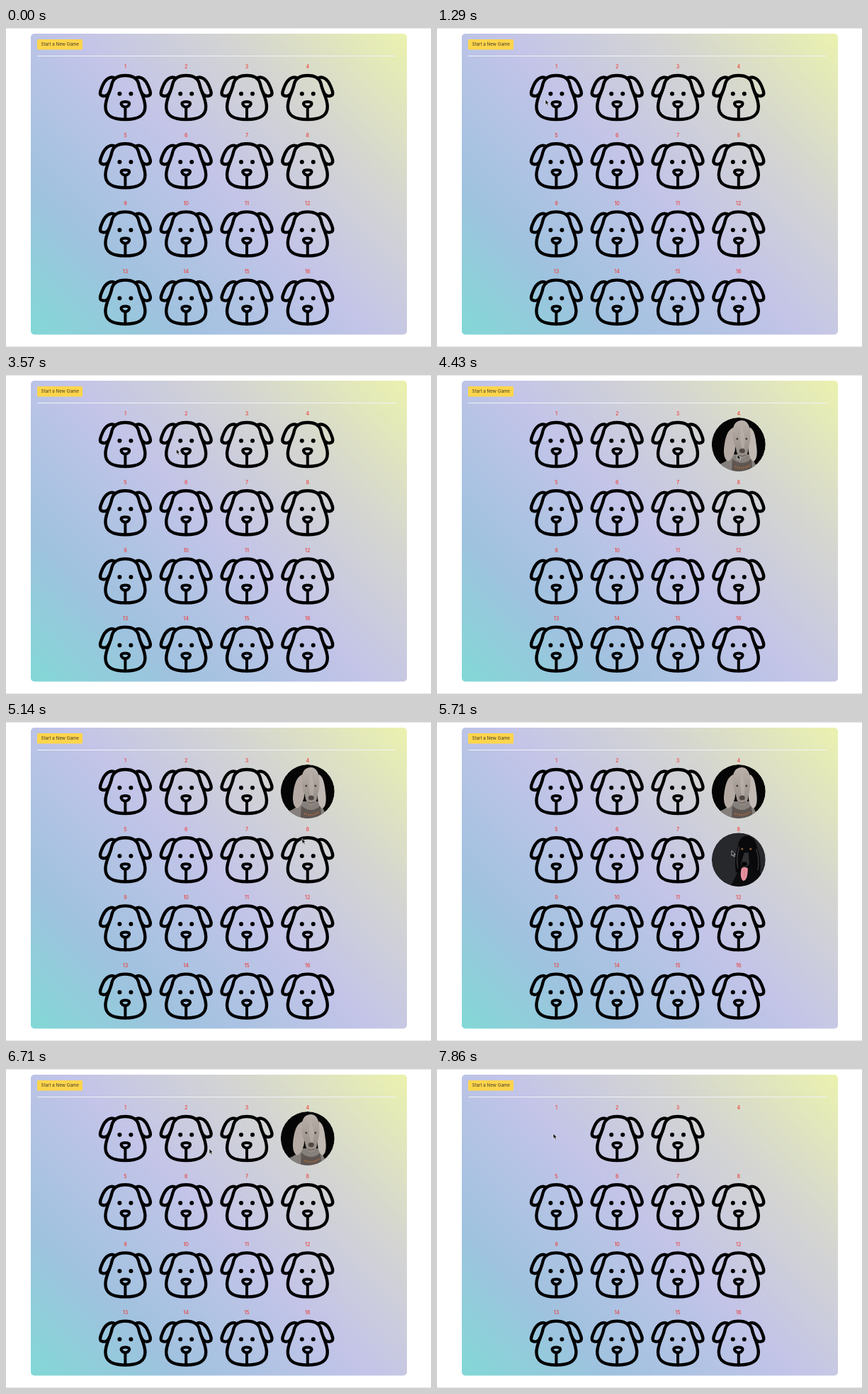
An HTML page that plays this animation: 600 px wide and 450 px high, repeating every 8 s.

```html
<!DOCTYPE html>
<html lang="en">
<head>
<meta charset="utf-8">
<title>Dog memory game</title>
<style>
  html, body { margin: 0; width: 100%; height: 100%; overflow: hidden; background: #fff; }
  svg { display: block; width: 100%; height: 100%; }
  text { font-family: Inter, Roboto, sans-serif; }
  .number { font-size: 7.2px; font-weight: 500; fill: #ee443e; text-anchor: middle; }
</style>
</head>
<body>
<svg viewBox="0 0 600 450">
  <defs>
    <!-- 45 degree gradient line spanning the panel corners -->
    <linearGradient id="backdrop" gradientUnits="userSpaceOnUse" x1="61.7" y1="458.8" x2="539.3" y2="-18.8">
      <stop offset="0" stop-color="#82d8d6"/>
      <stop offset=".22" stop-color="#9fc2df"/>
      <stop offset=".5" stop-color="#c3c4e8"/>
      <stop offset=".75" stop-color="#d5d6d0"/>
      <stop offset="1" stop-color="#ebf2ae"/>
    </linearGradient>
    <linearGradient id="coat" x2="0" y2="1">
      <stop offset="0" stop-color="#b9b1aa"/>
      <stop offset="1" stop-color="#928983"/>
    </linearGradient>
    <clipPath id="round"><circle r="38"/></clipPath>

    <g id="back" fill="none" stroke="#000" stroke-width="4.4" stroke-linecap="round" stroke-linejoin="round">
      <path d="M0-31C-10-31-17-27-19-19C-21-8-28 1-28 13C-28 26-18 31 0 31C18 31 28 26 28 13C28 1 21-8 19-19C17-27 10-31 0-31Z"/>
      <path id="ear" d="M-14-27C-22-32-29-24-32-17C-35-10-37-5-34-3C-30-1-25-2-23-7"/>
      <use href="#ear" transform="scale(-1 1)"/>
      <path d="M-5 7Q0 5 5 7Q7 9 4 12Q0 15 -4 12Q-7 9 -5 7ZM0 15V31" stroke-width="4"/>
      <path d="M-8-5.3h.01M8-5.3h.01" stroke-width="6"/>
    </g>

    <g id="grayDog" clip-path="url(#round)">
      <circle r="38" fill="#050505"/>
      <path d="M-38 40L-27 28Q-14 23-8 14L17 14Q22 25 30 40Z" fill="#85807c"/>
      <path d="M-9 20Q5 32 18 20L20 40H-10Z" fill="#5f5651"/>
      <path d="M-5 31Q6 36 16 29" fill="none" stroke="#b56b38" stroke-width="2" stroke-dasharray="1.5 1.5"/>
      <path d="M-7-24Q-17-21-20 0Q-23 19-15 24Q-8 21-5 8L-4-17Z" fill="#b4aaa3"/>
      <path d="M16-24Q23-21 25 0Q28 20 21 24Q15 21 14 8L13-17Z" fill="#c1b9b4"/>
      <path d="M5-34Q-7-34-8-20Q-9-5-4 5Q-2 18 5 20Q13 18 14 5Q18-6 16-22Q13-34 5-34Z" fill="url(#coat)"/>
      <path d="M4-29L2-9L4 5H8L9-9Z" fill="#c2bab4" opacity=".5"/>
      <ellipse cx="5" cy="9" rx="4" ry="3.3" fill="#514844"/>
      <path d="M0 15Q5 18 10 15" fill="none" stroke="#625751"/>
      <circle cx="-2" cy="-8" r="1.5" fill="#483f35"/>
      <circle cx="11" cy="-8" r="1.5" fill="#483f35"/>
    </g>

    <g id="blackDog" clip-path="url(#round)">
      <circle r="38" fill="#27282c"/>
      <path d="M-13 40Q-4 24 1 12L25 8Q35 25 39 40Z" fill="#0c0c0e"/>
      <path d="M12-34Q0-33-1-18Q-7-2-4 17Q1 22 6 10H19Q24 23 30 20Q33 1 26-18Q23-33 12-34Z" fill="#09090b"/>
      <path d="M1-18Q-4-2-1 12M25-15Q30 0 27 15" fill="none" stroke="#3e3f43" stroke-width="1.2"/>
      <path d="M8-10L3 6Q8 15 15 6L14-10Z" fill="#303034"/>
      <ellipse cx="8" cy="6" rx="4" ry="3" fill="#050506"/>
      <path d="M4 12Q8 9 13 12Q13 28 7 30Q1 27 4 12Z" fill="#e58f9d"/>
      <path d="M8 14V24" stroke="#c56f80" stroke-width=".7"/>
      <circle cx="5" cy="-15" r="1.4" fill="#94643a"/>
      <circle cx="17" cy="-15" r="1.4" fill="#94643a"/>
    </g>
  </defs>

  <path d="M0 .5H600M0 449.5H600" stroke="#e6e6e6"/>
  <rect x="35" y="8" width="531" height="424.5" rx="5" fill="url(#backdrop)"/>
  <rect x="44" y="16" width="64" height="14.5" rx="1.5" fill="#ffd54b"/>
  <text x="49.5" y="25.3" font-size="6.25" fill="#403b29">Start a New Game</text>
  <path d="M44.5 39.5H550" stroke="#f2f3f7" stroke-width="1.2"/>
  <g id="board"></g>
  <path id="cursor" d="M0 0V7.2L1.7 5.7L3 8.5L4.3 7.9L3.1 5.2H5.3Z" fill="#111" stroke="#fff" stroke-width=".6"/>
</svg>
<script>
  const LOOP = 8000, STEP = 1000 / 7;

  // Intervals during which each card shows its face
  const shown = {
    1: { face: 'grayDog', spans: [[1700, 3420], [7130, 7700]] },
    4: { face: 'grayDog', spans: [[4130, 7700]] },
    8: { face: 'blackDog', spans: [[5420, 6420]] }
  };
  const matched = { cards: [1, 4], from: 7700 };

  // Cursor stops: time, x, y
  const stops = [
    [850, 104, 42], [1285, 153, 101], [1700, 170, 101], [2571, 181, 100],
    [3420, 205, 103], [4000, 415, 112], [4428, 424, 112], [4850, 424, 115],
    [5280, 416, 180], [5714, 416, 182], [6280, 408, 170], [6714, 246, 93],
    [7000, 166, 92], [8000, 164, 91]
  ];

  const svgNode = (name, attributes, parent) => {
    const node = document.createElementNS('http://www.w3.org/2000/svg', name);
    for (const key in attributes) node.setAttribute(key, attributes[key]);
    return parent.appendChild(node);
  };

  const board = document.getElementById('board');
  const cursor = document.getElementById('cursor');
  const cards = Array.from({ length: 16 }, (_, i) => {
    const x = 168.4 + i % 4 * 85.8, y = 98 + Math.floor(i / 4) * 96.2;
    const cell = svgNode('g', { transform: `translate(${x} ${y})` }, board);
    svgNode('text', { class: 'number', y: -40.6 }, cell).textContent = i + 1;
    return svgNode('use', { href: '#back' }, cell);
  });

  function moveCursor(time) {
    const next = stops.findIndex(stop => stop[0] > time);
    cursor.style.display = next > 0 ? '' : 'none';
    if (next < 1) return;
    const [t0, x0, y0] = stops[next - 1], [t1, x1, y1] = stops[next];
    const p = (time - t0) / (t1 - t0), ease = p * p * (3 - 2 * p);
    cursor.setAttribute('transform', `translate(${x0 + (x1 - x0) * ease} ${y0 + (y1 - y0) * ease})`);
  }

  function draw(now) {
    const time = Math.floor(now % LOOP / STEP + .02) * STEP;
    for (const id in shown) {
      const { face, spans } = shown[id], card = cards[id - 1];
      const open = spans.some(([from, to]) => time >= from && time < to);
      const gone = matched.cards.includes(+id) && time >= matched.from;
      card.setAttribute('href', open ? '#' + face : '#back');
      card.style.display = gone ? 'none' : '';
    }
    moveCursor(time);
  }

  const start = performance.now();
  function frame() {
    draw(performance.now() - start);
    requestAnimationFrame(frame);
  }
  frame();
</script>
</body>
</html>
```
